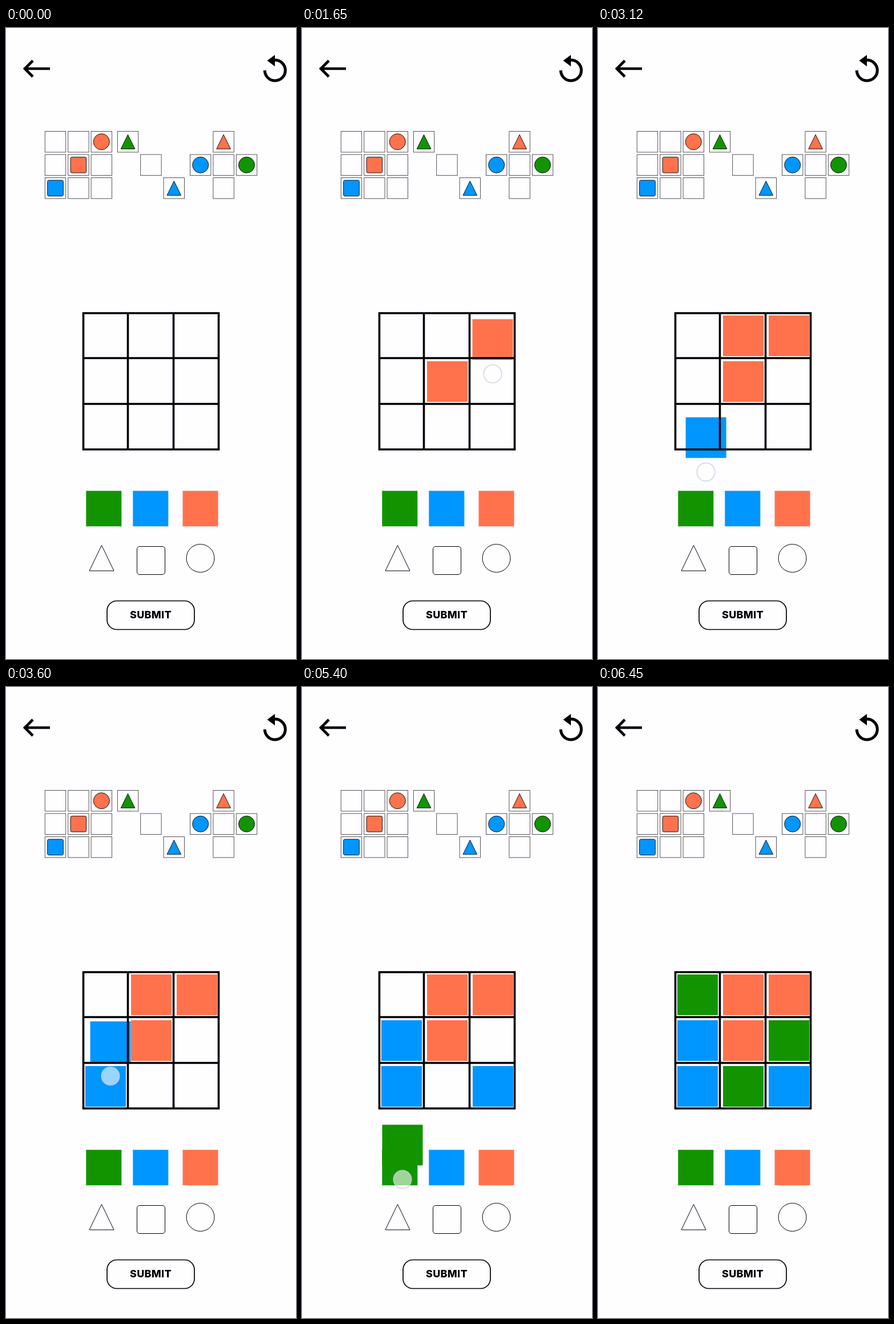
These frames come from a looping animation (508 px wide and 1102 px high, 6.51 s). An HTML page:

```html
<!DOCTYPE html>
<html lang="en">
<head>
<meta charset="utf-8">
<title>Grid puzzle</title>
<style>
  html, body { margin: 0; height: 100%; overflow: hidden; background: #fefdff; }
  svg { display: block; }
</style>
</head>
<body>
<svg width="508" height="1102" viewBox="0 0 508 1102" fill="none" stroke="#000">
  <g id="icons">
    <path d="M77 71H33M47 57L33 71L47 85" stroke-width="4.6"/>
    <path d="M453.3 74A18 18 0 1 0 471 56" stroke-width="5"/>
    <path d="M457.5 57L471 47V67Z" fill="#000" stroke="none"/>
  </g>
  <g id="clues" stroke-width=".9"></g>
  <g id="swatches" stroke="none"></g>
  <path d="M167.5 903.5L189 948H146Z"/>
  <rect x="229.5" y="905.5" width="49" height="49" rx="4.5"/>
  <circle cx="340.5" cy="926" r="24.5"/>
  <rect x="177" y="1000.5" width="153" height="50" rx="17" stroke-width="1.7"/>
  <text x="253.5" y="1031" fill="#000" stroke="none" text-anchor="middle"
        font-family="Inter, sans-serif" font-weight="800" font-size="18" letter-spacing=".3">SUBMIT</text>
  <g id="tiles" stroke="none"></g>
  <path d="M135.5 498H372.5V736H135.5ZM213.5 498V736M293.5 498V736M135.5 576.5H372.5M135.5 656.5H372.5" stroke-width="3.6"/>
  <circle id="finger" r="15.8" fill="#fff" fill-opacity=".6" stroke="#c8ccde" stroke-opacity=".75" stroke-width="1.8"/>
</svg>
<script>
const LOOP = 6510, TILE = 71, LIFT = 60;
const GREEN = '#129400', BLUE = '#0096ff', ORANGE = '#ff724c';
const $ = id => document.getElementById(id);

function add(parent, tag, attrs) {
  const el = document.createElementNS('http://www.w3.org/2000/svg', tag);
  for (const key in attrs) el.setAttribute(key, attrs[key]);
  return $(parent).appendChild(el);
}

// Clue cells: group left edge, column, row, optional shape and colour
function clue(left, col, row, shape, fill) {
  const x = left + col * 40.4, y = 180.5 + row * 40.5, cx = x + 18.2, cy = y + 18.2;
  add('clues', 'rect', { x, y, width: 36.4, height: 36.4, stroke: '#444' });
  if (shape === 'circle') add('clues', 'circle', { cx, cy, r: 14, fill });
  if (shape === 'square') add('clues', 'rect', { x: cx - 13.8, y: cy - 13.8, width: 27.6, height: 27.6, rx: 2.5, fill });
  if (shape === 'triangle') add('clues', 'path', { d: `M${cx} ${cy - 12.5}l12.3 25h-24.6z`, fill });
}

const first = { '2,0': ['circle', ORANGE], '1,1': ['square', ORANGE], '0,2': ['square', BLUE] };
for (let i = 0; i < 9; i++) {
  const col = i % 3, row = (i - col) / 3;
  clue(68.3, col, row, ...(first[[col, row]] || []));
}
clue(195.3, 0, 0, 'triangle', GREEN);
clue(195.3, 1, 1);
clue(195.3, 2, 2, 'triangle', BLUE);
clue(322.5, 1, 0, 'triangle', ORANGE);
clue(322.5, 0, 1, 'circle', BLUE);
clue(322.5, 1, 1);
clue(322.5, 2, 1, 'circle', GREEN);
clue(322.5, 1, 2);

[[140.3, GREEN], [222.3, BLUE], [309.5, ORANGE]].forEach(([x, fill]) =>
  add('swatches', 'rect', { x, y: 808.3, width: 62, height: 62, fill }));

// Each move: colour, cell, time of snapping, finger path as [time, x, y]
const moves = [
  { fill: ORANGE, col: 0, row: 2, snap: 750, until: 1020, path: [[210, 340, 855], [480, 177, 763], [570, 174, 758]] },
  { fill: ORANGE, col: 1, row: 1, snap: 1350, path: [[1020, 176, 718], [1320, 255, 678]] },
  { fill: ORANGE, col: 2, row: 0, snap: 1920, path: [[1560, 340, 832], [1650, 334, 604], [1740, 336, 601]] },
  { fill: ORANGE, col: 1, row: 0, snap: 2490, path: [[2160, 350, 855], [2460, 255, 598]] },
  { fill: BLUE, col: 0, row: 2, snap: 3270, path: [[2880, 254, 855], [3210, 175, 758]] },
  { fill: BLUE, col: 0, row: 1, snap: 3810, path: [[3480, 264, 855], [3600, 183, 679.5], [3660, 176, 677]] },
  { fill: BLUE, col: 2, row: 2, snap: 4380, path: [[3900, 256, 854], [4200, 335, 759]] },
  { fill: GREEN, col: 0, row: 0, snap: 5670, path: [[5280, 176, 861], [5400, 176, 860], [5640, 175, 598]] },
  { fill: GREEN, col: 1, row: 2, snap: 6060, path: [[5790, 174, 855], [6030, 255, 758]] },
  { fill: GREEN, col: 2, row: 1, snap: 6450, path: [[6210, 176, 855], [6420, 335, 678]] },
];
for (const m of moves) m.el = add('tiles', 'rect', { width: TILE, height: TILE, fill: m.fill });

function along(path, t) {
  const i = path.findIndex(p => p[0] > t);
  if (i < 0) return path[path.length - 1].slice(1);
  const [t0, x0, y0] = path[i - 1], [t1, x1, y1] = path[i];
  const p = (t - t0) / (t1 - t0), e = p * p * (3 - 2 * p);
  return [x0 + (x1 - x0) * e, y0 + (y1 - y0) * e];
}

const place = (el, x, y) => el.setAttribute('transform', `translate(${x} ${y})`);
const show = (el, on) => el.setAttribute('visibility', on ? 'visible' : 'hidden');

function draw(t) {
  let touching = false;
  for (const { el, col, row, snap, until = LOOP, path } of moves) {
    const visible = t >= path[0][0] && t < until;
    show(el, visible);
    if (!visible) continue;
    const [x, y] = along(path, t);
    if (t >= snap) place(el, 139 + 80 * col, 502 + 80 * row);
    else place(el, x - TILE / 2, y - LIFT - TILE / 2);
    if (t < path[path.length - 1][0]) {
      touching = true;
      place($('finger'), x, y);
    }
  }
  show($('finger'), touching);
}

const start = performance.now();
function tick() {
  draw((performance.now() - start) % LOOP);
  requestAnimationFrame(tick);
}
tick();
</script>
</body>
</html>
```
